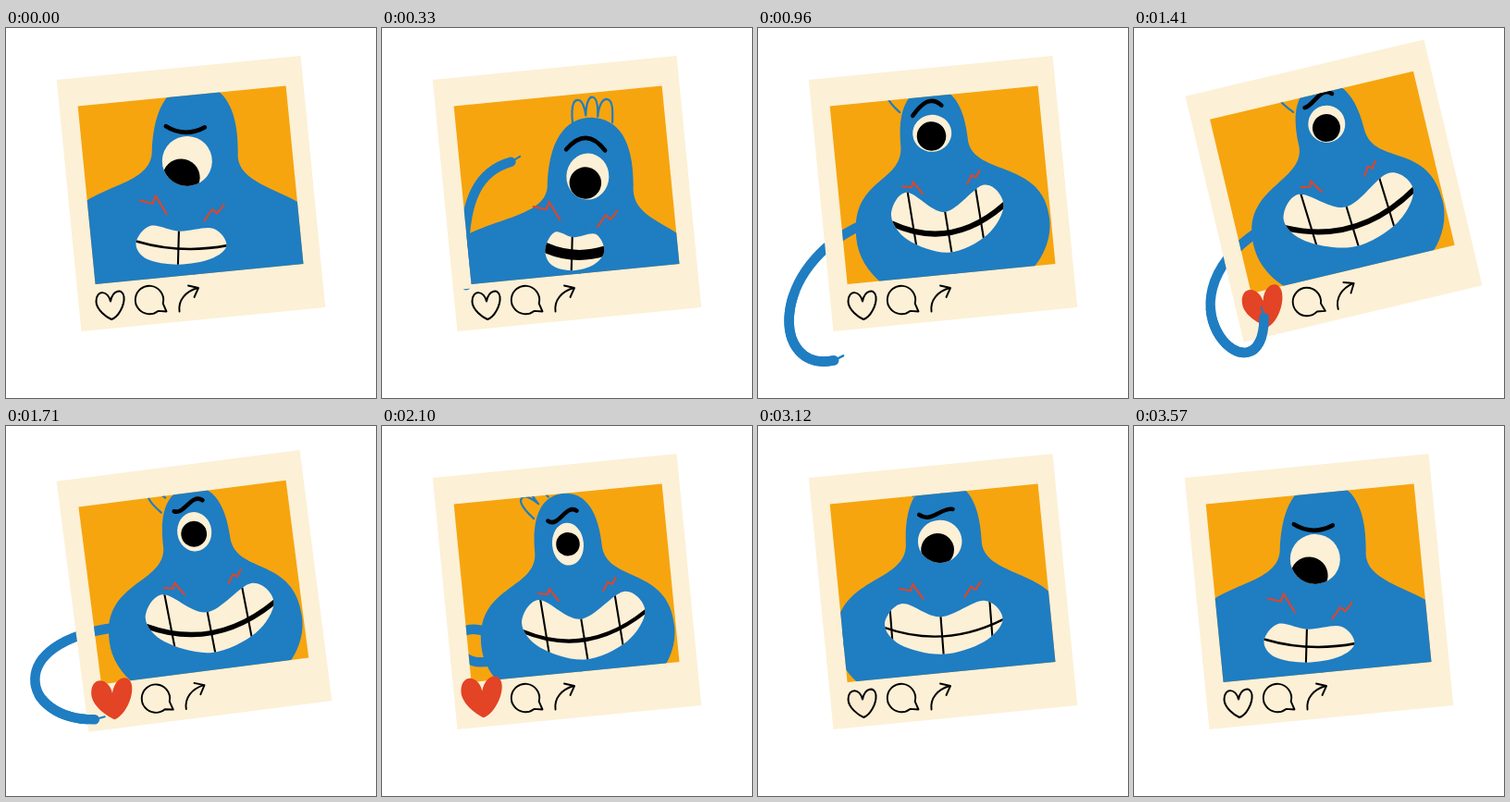
These frames come from a looping animation (400 by 400 pixels, 3.6 s). An HTML page with a canvas:

```html
<!DOCTYPE html>
<html lang="en">
<head>
<meta charset="utf-8">
<title>Like monster</title>
<style>
  html, body { margin: 0; width: 100%; height: 100%; overflow: hidden; background: #fff; }
  canvas { display: block; width: 400px; height: 400px; }
</style>
</head>
<body>
<canvas width="400" height="400"></canvas>
<script>
const ctx = document.querySelector('canvas').getContext('2d');
const LOOP = 3600;
const CREAM = '#fcf0d6', ORANGE = '#f6a50f', BLUE = '#1f7dc2', RED = '#e24425', BLACK = '#000';
const REST_ANGLE = -.098;

// Everything lives in the card's own frame: origin at its centre, axes along its edges.
const CARD = box(-132.5, -136.6, 265, 273.2);
const PHOTO = box(-112.5, -106, 226, 193.4);
const BELOW_PHOTO = box(-300, 92, 600, 300);

// Head x and top, eye height and radii, gaze drop, brow bend, mouth x, y, half width, bite line width.
const face = track([
  { at: 0, x: 3, top: -119, eye: -35, rx: 27, ry: 27, look: 18, bend: 6, mx: -9, my: 55, mw: 49, bite: 2.6 },
  { at: 330, x: 25, top: -83, eye: -19, rx: 23, ry: 25, look: 7, bend: -13, mx: 10, my: 61, mw: 32, bite: 11 },
  { at: 960, x: -4, top: -116, eye: -66, rx: 21, ry: 20, look: 3, bend: -9, mx: 3, my: 18, mw: 61, bite: 6 },
  { at: 1410, x: 11, top: -117, eye: -72, rx: 20, ry: 20, look: 4, bend: -4, mx: 12, my: 18, mw: 72, bite: 6 },
  { at: 2100, x: 6, top: -106, eye: -51, rx: 17, ry: 23, look: 0, bend: 0, mx: 15, my: 29, mw: 67, bite: 4.2 },
  { at: 2730, x: 3, top: -121, eye: -70, rx: 20, ry: 20, look: 1, bend: 0, mx: 9, my: 14, mw: 76, bite: 2.2 },
  { at: 3570 }
]);

// Two control points (a, b) and the hand (h) of one curve that starts at the shoulder.
const arm = track([
  { at: 0, ax: -124, ay: 50, bx: -124, by: 45, hx: -122, hy: 40 },
  { at: 330, ax: -118, ay: -15, bx: -85, by: -35, hx: -57, hy: -40 },
  { at: 960, ax: -195, ay: 60, bx: -204, by: 175, hx: -135, hy: 168 },
  { at: 1410, ax: -224, ay: 74, bx: -128, by: 210, hx: -105, hy: 116 },
  { at: 1680, ax: -215, ay: 30, bx: -205, by: 120, hx: -125, hy: 125 },
  { at: 2100, ax: -135, ay: 15, bx: -135, by: 70, hx: -92, hy: 67 },
  { at: 2730, ax: -135, ay: 5, bx: -135, by: 60, hx: -96, hy: 58 },
  { at: 3570 }
]);

const HEART = new Path2D('M.5-4C-2-16-15-17-15-4C-15 5-4 13 1.5 15.5C9 13 16 0 15-9C14-18 3-17 .5-4Z');
const ARROW = new Path2D('M187.5 306.5C186 294 194 285 207 281M197 278.5L208 281L203.5 291');
const HAIR = new Path2D('M-21 7C-24-16-19-20-14-18C-10-16-8-8-7-2C-7-18-3-23 0-22C5-21 6-10 6-1C7-16 12-21 16-20C22-19 22-8 22 5');
const BUBBLE = new Path2D();
BUBBLE.arc(155, 294, 15.2, .9, .25 + 2 * Math.PI);
BUBBLE.lineTo(173.5, 306.5);
BUBBLE.closePath();

// Returns t => pose on a monotone cubic through the keys; the last key repeats the first.
function track(keys) {
  const last = keys.length - 1;
  keys[last] = { ...keys[0], ...keys[last] };
  const rate = (i, name) => (keys[i + 1][name] - keys[i][name]) / (keys[i + 1].at - keys[i].at);
  const slope = (i, name) => {
    if (i === 0 || i === last) return 0;
    const a = rate(i - 1, name), b = rate(i, name);
    return a * b > 0 ? 2 * a * b / (a + b) : 0;
  };
  return t => {
    const i = Math.max(0, Math.min(last, keys.findIndex(k => k.at > t) + last + 1) - last - 1 + 0 || 0, indexAt(keys, t));
    const from = keys[i], to = keys[i + 1], span = to.at - from.at;
    const u = Math.min(1, (t - from.at) / span);
    const pose = {};
    for (const name in from) {
      pose[name] = from[name] + (to[name] - from[name]) * u * u * (3 - 2 * u)
        + span * u * (1 - u) * (slope(i, name) * (1 - u) - slope(i + 1, name) * u);
    }
    return pose;
  };
}

function indexAt(keys, t) {
  let i = 0;
  while (i < keys.length - 2 && t >= keys[i + 1].at) i++;
  return i;
}

function ease(t, start, end) {
  const u = Math.min(1, Math.max(0, (t - start) / (end - start)));
  return u * u * (3 - 2 * u);
}

function box(x, y, w, h) {
  const path = new Path2D();
  path.rect(x, y, w, h);
  return path;
}

function ellipse(x, y, rx, ry) {
  const path = new Path2D();
  path.ellipse(x, y, rx, ry, 0, 0, 2 * Math.PI);
  return path;
}

function polyline(...points) {
  const path = new Path2D();
  for (const [x, y] of points) path.lineTo(x, y);
  return path;
}

// Closed smooth curve through the points.
function blob(points) {
  const path = new Path2D();
  const n = points.length;
  path.moveTo(...points[0]);
  points.forEach((b, i) => {
    const a = points[(i + n - 1) % n], c = points[(i + 1) % n], d = points[(i + 2) % n];
    path.bezierCurveTo(b[0] + (c[0] - a[0]) / 6, b[1] + (c[1] - a[1]) / 6,
      c[0] - (d[0] - b[0]) / 6, c[1] - (d[1] - b[1]) / 6, ...c);
  });
  return path;
}

function fill(path, color) {
  ctx.fillStyle = color;
  ctx.fill(path);
}

function stroke(path, color, width) {
  ctx.strokeStyle = color;
  ctx.lineWidth = width;
  ctx.stroke(path);
}

function scoped(draw) {
  ctx.save();
  draw();
  ctx.restore();
}

function clipped(path, draw) {
  scoped(() => {
    ctx.clip(path);
    draw();
  });
}

// Derived body sizes; grin goes from 0 (sulking) to 1 (grinning).
function measure({ x, top }, grin) {
  const sulk = 1 - grin;
  const neck = top + 62 + 15 * sulk;
  return { x, top, neck, head: 36.5 + 10 * sulk, belly: 105 + 45 * sulk, waist: neck + 93 + 15 * sulk };
}

function drawBody({ x, top, neck, head, belly, waist }) {
  const centre = 7, bottom = waist + 82;
  for (const side of [-1, 1]) {
    const hip = centre + side * belly, edge = x + side * head;
    const half = new Path2D();
    half.moveTo(x - side, top);
    half.bezierCurveTo(x + side * head * .65, top, edge, neck - .65 * (neck - top), edge, neck);
    half.bezierCurveTo(edge + side * 3, neck + .42 * (waist - neck), hip, neck + .3 * (waist - neck), hip, waist);
    half.bezierCurveTo(hip, waist + 45, centre + side * belly * .55, bottom, centre - side, bottom);
    half.lineTo(x - side, neck);
    fill(half, BLUE);
  }
}

function drawHair({ x, top, head }, grin) {
  scoped(() => {
    ctx.translate(x, top + head);
    ctx.rotate(-.6 * grin);
    ctx.translate(0, -head);
    stroke(HAIR, BLUE, 2.2);
  });
}

function drawArm({ ax, ay, bx, by, hx, hy }, { belly, waist }) {
  const path = new Path2D();
  path.moveTo(Math.max(15 - belly, -118), waist - 14);
  path.bezierCurveTo(ax, ay, bx, by, hx, hy);
  stroke(path, BLUE, 10.5);
  const len = Math.hypot(hx - bx, hy - by);
  const dx = (hx - bx) / len, dy = (hy - by) / len;
  stroke(polyline([hx, hy], [hx + 11 * dx + 3 * dy, hy + 11 * dy - 3 * dx]), BLUE, 2);
}

function drawEye({ x, eye, rx, ry, look, bend }, grin) {
  const ex = x - .45 * look;
  const white = ellipse(ex, eye, rx, ry);
  fill(white, CREAM);
  clipped(white, () => fill(ellipse(ex - look / 3, eye + look, .75 * rx, .75 * rx), BLACK));

  const bx = ex - 3, by = eye - ry - 8, half = 21 - 5 * grin;
  const rise = 4 * grin, wave = grin * (9 + bend);
  const brow = new Path2D();
  brow.moveTo(bx - half, by + rise - bend / 3);
  brow.bezierCurveTo(bx - half / 3, by + rise + bend + wave, bx + half / 3, by - rise + bend - wave,
    bx + half, by - rise - bend / 3);
  stroke(brow, BLACK, 4.6);
}

function drawMouth({ mx, my, mw, bite }, grin) {
  const at = (x, y) => [mx + x * mw, my + y];
  const lips = blob([
    at(-1, 0), at(-.69, -19 - 4 * grin), at(-.05, -14 + 16 * grin), at(.69, -18 - 5 * grin),
    at(1, 0), at(.66, 15 + 16 * grin), at(-.05, 22 + 24 * grin), at(-.75, 17 + 11 * grin)
  ]);
  fill(lips, CREAM);
  clipped(lips, () => {
    const line = new Path2D();
    line.moveTo(...at(-1, -2 + 11 * grin));
    line.quadraticCurveTo(...at(0, 11 + 34 * grin), ...at(1.02, 0));
    stroke(line, BLACK, bite);
    for (const gap of [-1, 0, 1]) {
      const x = mx - 3 + gap * mw * (1.15 - .55 * grin);
      stroke(polyline([x - 3 * grin, my - 50], [x + 4 * grin, my + 60]), BLACK, 2.1);
    }
  });
}

function drawCheeks({ mx, my }, grin) {
  const size = 1.4 - .4 * grin;
  const zigzag = (x, y, ...steps) =>
    stroke(polyline([x, y], ...steps.map(([dx, dy]) => [x + dx * size, y + dy * size])), RED, 2);
  zigzag(mx - 46, my - 46 + 16 * grin, [10, 2], [12, -4], [21, 10]);
  zigzag(mx + 24, my - 26, [6, -9], [10, -6], [15, -13]);
}

function drawIcons(t) {
  const shrink = ease(t, 2200, 2560), reset = ease(t, 2800, 3150), touch = ease(t, 1240, 1340);
  const grow = touch - shrink;
  const size = 1 + .47 * grow - .13 * (shrink - reset);
  scoped(() => {
    ctx.rotate(-REST_ANGLE);
    ctx.translate(-200, -179);
    stroke(BUBBLE, BLACK, 1.9);
    stroke(ARROW, BLACK, 1.9);
    ctx.translate(112.5 - 5 * grow, 299.5 - 7 * grow);
    ctx.scale(size, size);
    ctx.globalAlpha = touch - reset;
    fill(HEART, RED);
    ctx.globalAlpha = 1;
    if (size < 1.2) stroke(HEART, BLACK, 2 / size);
  });
}

function render(now) {
  const t = now % LOOP;
  const grin = ease(t, 330, 960) - ease(t, 2730, 3570);
  const push = ease(t, 1130, 1400) - ease(t, 1460, 1820)
    + .09 * (ease(t, 2150, 2350) - ease(t, 2350, 2700));
  const pose = face(t), size = measure(pose, grin), reach = arm(t);

  ctx.clearRect(0, 0, 400, 400);
  scoped(() => {
    ctx.lineCap = ctx.lineJoin = 'round';
    ctx.translate(200 + 16 * push, 179 - 3 * push);
    ctx.rotate(REST_ANGLE - .135 * push);
    drawArm(reach, size);
    fill(CARD, CREAM);
    fill(PHOTO, ORANGE);
    clipped(PHOTO, () => {
      drawArm(reach, size);
      ctx.rotate(.125 * (1 - grin));
      drawHair(size, grin);
      drawBody(size);
      drawEye(pose, grin);
      drawCheeks(pose, grin);
      drawMouth(pose, grin);
    });
    drawIcons(t);
    // The hand reaches around to the front of the card.
    clipped(BELOW_PHOTO, () => drawArm(reach, size));
  });
  requestAnimationFrame(render);
}
requestAnimationFrame(render);
</script>
</body>
</html>
```
